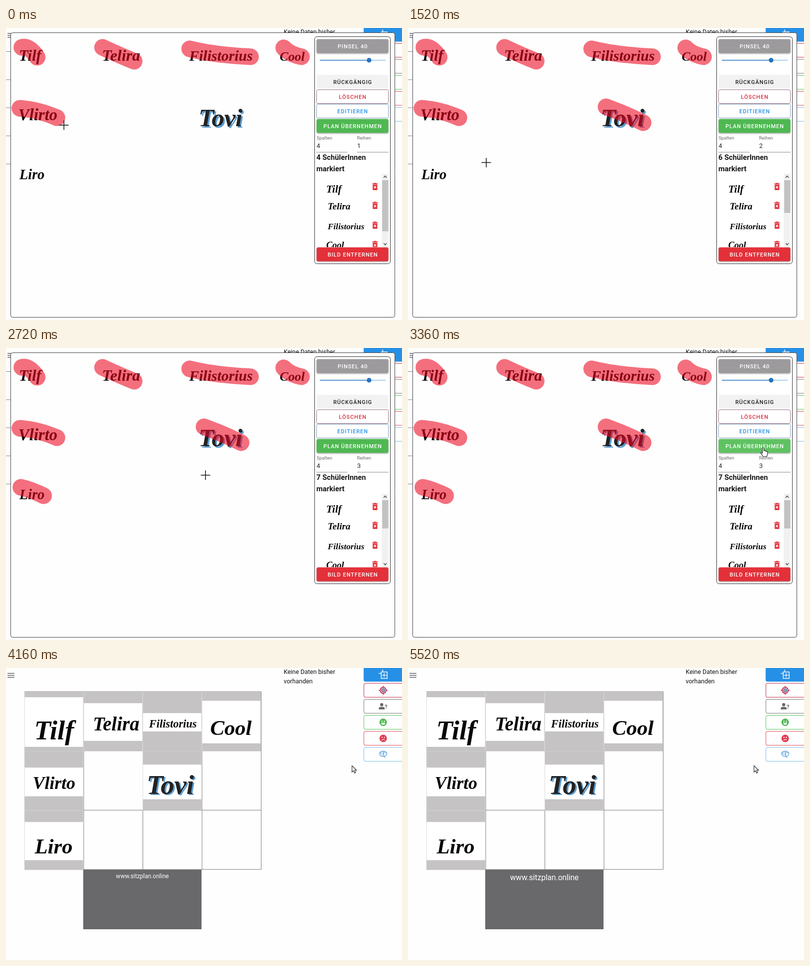
An HTML page with a canvas that plays this animation: 800 by 589 pixels, repeating every 5680 ms.

```html
<!DOCTYPE html>
<html lang="de">
<head>
<meta charset="utf-8">
<title>Sitzplan</title>
<style>
  html, body { margin: 0; width: 100%; height: 100%; overflow: hidden; background: #fefefe; }
  canvas { display: block; }
</style>
</head>
<body>
<canvas id="stage" width="800" height="589"></canvas>
<script>
const ctx = document.getElementById('stage').getContext('2d');
const LOOP = 5680, STEP = 80;
const UI = 'Roboto, "Noto Sans", sans-serif';
const SCRIPT = 'italic bold {}px "Liberation Serif", "Times New Roman", serif';
const RED = '#e33039', BLUE = '#2590e6', GREEN = '#4eb851';

// note: x, baseline, size on the sheet; mark: start, bend, end of the brush stroke;
// seat: column, row; band: white strip in the seat; tag: x, baseline, size in the seat
const pupils = [
  { name: 'Tilf', note: [26, 66, 31], mark: [32, 39, 47, 42, 63, 59], seat: [0, 0], band: [11, 111], tag: [20, 96, 55] },
  { name: 'Telira', note: [194, 66, 32], mark: [195, 39, 228, 54, 259, 67], seat: [1, 0], band: [23, 99], tag: [19, 78, 39] },
  { name: 'Filistorius', note: [370, 66, 30], mark: [371, 42, 425, 52, 494, 58], seat: [2, 0], band: [43, 80], tag: [13, 72, 22.5] },
  { name: 'Cool', note: [553, 66, 26], mark: [561, 40, 576, 51, 597, 58], seat: [3, 0], band: [18, 104], tag: [17, 87, 43] },
  { name: 'Vlirto', note: [25, 186, 33], mark: [28, 162, 65, 168, 103, 181], seat: [0, 1], band: [33, 91], tag: [17, 76, 36] },
  { name: 'Tovi', note: [389, 198, 51], mark: [400, 159, 438, 174, 475, 191], seat: [2, 1], band: [27, 97], tag: [8, 86, 55], shadow: true, from: 640, to: 960 },
  { name: 'Liro', note: [27, 305, 28.6], mark: [30, 281, 53, 288, 76, 298], seat: [0, 2], band: [23, 100], tag: [21, 86, 43], from: 1760, to: 2160 }
];
const listRows = [[647, 332, 21, 320], [650, 366, 19, 358], [650, 406, 17.3, 398], [647, 444, 18.5, 437]];

// time, x, y
const pointer = [
  [0, 117, 196], [80, 117, 196], [640, 411, 173], [960, 487, 204], [1040, 487, 204],
  [1760, 43, 295], [2160, 89, 312], [2240, 89, 312], [3200, 717, 201], [3520, 718, 201], [4000, 699, 197]
];

const clamp = v => Math.max(0, Math.min(1, v));
const ease = v => { v = clamp(v); return v * v * (3 - 2 * v); };

function rect(x, y, w, h, color) {
  ctx.fillStyle = color;
  ctx.fillRect(x, y, w, h);
}

function box(x, y, w, h, r, fill, stroke) {
  ctx.beginPath();
  ctx.roundRect(x, y, w, h, r);
  if (fill) { ctx.fillStyle = fill; ctx.fill(); }
  if (stroke) { ctx.strokeStyle = stroke; ctx.lineWidth = 1; ctx.stroke(); }
}

function line(color, width, ...pts) {
  ctx.beginPath();
  for (let i = 0; i < pts.length; i += 2) ctx.lineTo(pts[i], pts[i + 1]);
  ctx.strokeStyle = color;
  ctx.lineWidth = width;
  ctx.stroke();
}

function disc(x, y, r, color) {
  ctx.beginPath();
  ctx.arc(x, y, r, 0, 7);
  ctx.fillStyle = color;
  ctx.fill();
}

function ring(x, y, r, color, width, from = 0, to = 7) {
  ctx.beginPath();
  ctx.arc(x, y, r, from, to);
  ctx.strokeStyle = color;
  ctx.lineWidth = width;
  ctx.stroke();
}

function text(str, x, y, size, color, { weight = 400, align = 'left', spacing = 0 } = {}) {
  ctx.font = `${weight} ${size}px ${UI}`;
  ctx.textAlign = align;
  ctx.letterSpacing = spacing + 'px';
  ctx.fillStyle = color;
  ctx.fillText(str, x, y);
  ctx.letterSpacing = '0px';
}

function lettering(p, x, y, size) {
  ctx.font = SCRIPT.replace('{}', size);
  ctx.textAlign = 'left';
  if (p.shadow) {
    ctx.fillStyle = '#5b9dd2';
    ctx.fillText(p.name, x + 3, y + 2.5);
  }
  ctx.fillStyle = p.shadow ? '#222' : '#080808';
  ctx.fillText(p.name, x, y);
}

function button(label, y, color, fill, border, raised) {
  ctx.save();
  if (raised) {
    ctx.shadowColor = 'rgba(0,0,0,.35)';
    ctx.shadowBlur = 3;
    ctx.shadowOffsetY = 1.5;
  }
  box(627.5, y + .5, 145, 28, 3, fill, border);
  ctx.restore();
  text(label, 700.5, y + 18.5, 11, color, { weight: 500, align: 'center', spacing: 1 });
}

function face(y, color, happy) {
  disc(762, y, 7.5, color);
  disc(759.5, y - 2, 1.2, '#fff');
  disc(764.5, y - 2, 1.2, '#fff');
  if (happy) {
    ctx.beginPath();
    ctx.arc(762, y + 1, 4, 0, Math.PI);
    ctx.fillStyle = '#fff';
    ctx.fill();
  } else line('#fff', 1.3, 758.5, y + 4, 762, y + 2, 765.5, y + 3);
}

function sideButtons() {
  box(722.5, -4, 84, 31.5, 4, BLUE);
  ctx.strokeStyle = '#fff';
  ctx.lineWidth = 1.4;
  ctx.strokeRect(758, 8, 12, 13);
  line('#fff', 1.2, 764, 10, 764, 19);
  line('#fff', 1.2, 759, 14.5, 769, 14.5);
  line('#fff', 1.4, 753, 11, 758, 11);
  line('#fff', 1.4, 761, 3, 761, 8);
  ['#c32c4e', '#777', '#55c558', '#e04457', '#78bbed'].forEach((c, i) =>
    box(723, 31 + i * 32.3, 84, 28, 3, '#fff', c));

  ring(762, 45, 6, '#c32c4e', 1.8);
  ring(762, 45, 3, '#35507e', 1.6);
  disc(762, 45, 1.2, '#c32c4e');
  for (const [dx, dy] of [[1, 0], [-1, 0], [0, 1], [0, -1]])
    line('#c32c4e', 1.6, 762 + 5 * dx, 45 + 5 * dy, 762 + 9 * dx, 45 + 9 * dy);

  disc(759, 74, 3.2, '#666');
  box(753, 78.5, 12, 5, [4, 4, 0, 0], '#666');
  text('?', 765, 81.5, 11, '#666', { weight: 700 });
  face(109.5, '#4cba4f', true);
  face(142, '#e13a4e', false);

  ctx.beginPath();
  ctx.ellipse(762, 173, 7.5, 5.5, 0, 0, 7);
  ctx.fillStyle = '#fff';
  ctx.fill();
  ctx.strokeStyle = '#67afe6';
  ctx.lineWidth = 1.5;
  ctx.stroke();
  ring(759, 172, 2.2, '#67afe6', 1.2, 1, 5);
  ring(765, 172, 2.2, '#67afe6', 1.2, 2, 6.5);
  line('#67afe6', 1.5, 762, 168, 762, 176, 766, 181);
}

function pageBase() {
  rect(0, 0, 800, 589, '#fefefe');
  for (const y of [10, 14, 18]) rect(3, y, 14, 1.5, '#666');
  text('Keine Daten bisher', 561, 12, 12.5, '#151515');
  text('vorhanden', 561, 31, 12.5, '#151515');
  sideButtons();
}

function grid(x, y, cols, rows, size) {
  const right = x + cols * size, bottom = y + rows * size;
  for (let c = 0; c <= cols; c++) line('#7c7c7c', 1, x + c * size, y, x + c * size, bottom);
  for (let r = 0; r <= rows; r++) line('#7c7c7c', 1, x, y + r * size, right, y + r * size);
}

function seat(p, scale) {
  const pitch = 119.5;
  ctx.save();
  ctx.translate(37 + p.seat[0] * pitch, 48 + p.seat[1] * 119.8);
  ctx.scale(scale, scale);
  rect(0, 0, pitch, 119.8, '#d8d7d8');
  rect(.8, .5, pitch - 1.6, 119, '#c5c3c4');
  rect(.8, p.band[0], pitch - 1.6, p.band[1] - p.band[0], '#fff');
  ctx.beginPath();
  ctx.rect(0, 0, pitch, 119.8);
  ctx.clip();
  lettering(p, ...p.tag);
  ctx.restore();
}

function planScene(t) {
  const small = t < 4080;
  pageBase();
  if (small) grid(37.5, 48, 10, 4, 56.5);
  else grid(37.5, 47.8, 4, 3, 119.5);
  pupils.forEach(p => seat(p, small ? .473 : 1));
  if (small) rect(219, 471, 113, 56, '#69696b');
  else rect(156, 407, 239, 120, '#69696b');
  const large = t >= 4240;
  text('www.sitzplan.online', 275.5, small ? 487 : large ? 428 : 424, large ? 15.6 : 12, '#fff', { align: 'center' });
}

function brush(p, t) {
  const amount = p.from === undefined ? 1 : ease((t - p.from) / (p.to - p.from));
  if (p.from !== undefined && t < p.from) return;
  const [x0, y0, x1, y1, x2, y2] = p.mark;
  ctx.beginPath();
  for (let i = 0; i <= 20; i++) {
    const u = amount * i / 20, v = 1 - u;
    const bend = 4 * u * v;
    ctx.lineTo(x0 * v + x2 * u + bend * (x1 - (x0 + x2) / 2), y0 * v + y2 * u + bend * (y1 - (y0 + y2) / 2));
  }
  if (amount === 0) ctx.lineTo(x0 + .01, y0);
  ctx.strokeStyle = 'rgba(238,0,28,.56)';
  ctx.lineWidth = 33.5;
  ctx.lineCap = ctx.lineJoin = 'round';
  ctx.stroke();
  ctx.lineCap = 'butt';
  ctx.lineJoin = 'miter';
}

function trash(x, y) {
  rect(x - 5.5, y - 6.5, 11, 1.8, RED);
  rect(x - 2.5, y - 7.5, 5, 1.5, RED);
  box(x - 4.7, y - 4, 9.4, 11, 1, RED);
  line('#fff', 1.3, x - 2.2, y - 1, x + 2.2, y + 3.5);
  line('#fff', 1.3, x + 2.2, y - 1, x - 2.2, y + 3.5);
}

function pupilList(count) {
  ctx.save();
  ctx.beginPath();
  ctx.rect(625, 294, 150, 148);
  ctx.clip();
  listRows.forEach(([x, y, size, iconY], i) => {
    lettering(pupils[i], x, y, size);
    trash(745.5, iconY);
  });
  rect(759, 294, 14, 148, '#f1f1f1');
  rect(760, 307, 12.5, [103, 81, 66, 57][count - 4], '#c2c2c2');
  line('#505050', 1.5, 763, 302, 766, 298.5, 769, 302);
  line('#505050', 1.5, 763, 434, 766, 437.5, 769, 434);
  ctx.restore();
}

function panel(t) {
  const count = 4 + (t >= 80) + (t >= 1040) + (t >= 2240);
  box(623.5, 17.5, 153, 458, 5, '#fff', '#333');
  button('PINSEL 40', 22, '#fff', '#9c9a9c', null, true);
  line('#8cc0ec', 1.5, 733, 65, 767, 65);
  line('#2374c0', 1.6, 634, 65, 733, 65);
  disc(733.5, 65, 4.7, '#2374c0');
  button('RÜCKGÄNGIG', 94, '#222', '#f3f2f3');
  button('LÖSCHEN', 124, '#d92c40', '#fff', '#9b7084');
  button('EDITIEREN', 153, BLUE, '#fff', '#7d9ebb');
  button('PLAN ÜBERNEHMEN', 183, '#fff', t >= 3200 ? '#5fc262' : GREEN, null, true);
  text('Spalten', 627.5, 225, 9.4, '#6c6c6c');
  text('Reihen', 709, 225, 9.4, '#6c6c6c');
  text('4', 627.5, 242, 12.5, '#222');
  text(Math.ceil(count / 2) - 1 + (count === 6 ? 0 : 0), 709.5, 242, 12.5, '#222');
  line('#909090', 1, 627, 250.5, 690, 250.5);
  line('#909090', 1, 709, 250.5, 773, 250.5);
  text(count + ' SchülerInnen', 627, 266, 14.8, '#181818', { weight: 700 });
  text('markiert', 627, 288.5, 14.8, '#181818', { weight: 700 });
  pupilList(count);
  button('BILD ENTFERNEN', 442, '#fff', RED, null, true);
}

function markingScene(t) {
  pageBase();
  for (let i = 0; i < 5; i++) line('#858585', 1, 0, 47.5 + i * 56.7, 37, 47.5 + i * 56.7);
  box(9.5, 9.5, 776, 574, 4, '#fefefe', '#444');
  pupils.forEach(p => lettering(p, ...p.note));
  pupils.forEach(p => brush(p, t));
  panel(t);
}

function pointerAt(t) {
  const next = pointer.findIndex(k => k[0] > t);
  if (next < 0) return pointer[pointer.length - 1].slice(1);
  const [ta, xa, ya] = pointer[next - 1], [tb, xb, yb] = pointer[next];
  const u = ease((t - ta) / (tb - ta));
  return [xa + (xb - xa) * u, ya + (yb - ya) * u];
}

const arrowShape = new Path2D('M0 0V13L3 10.2L5.2 15L7.4 14L5.3 9.3H9.2Z');
const handShape = new Path2D('M-1.5 1Q0 -1 1.5 1V6Q3 5 4 7Q5.5 6 6.5 8Q9 7 9 10V13Q8 15 7.5 18H-.5Q-2 14-5 11Q-4.5 8.5-1.5 11Z');

function drawPointer(t) {
  const [x, y] = pointerAt(t);
  if (x < 623 && t < 4000) {
    line('#111', 1.5, x - 9.5, y, x + 9.5, y);
    line('#111', 1.5, x, y - 9.5, x, y + 9.5);
    return;
  }
  ctx.save();
  ctx.translate(x, y);
  const shape = t >= 3200 && t < 4000 ? handShape : arrowShape;
  ctx.fillStyle = '#fff';
  ctx.fill(shape);
  ctx.strokeStyle = '#222';
  ctx.lineWidth = 1.1;
  ctx.stroke(shape);
  ctx.restore();
}

function frame(now) {
  const t = Math.floor((now % LOOP) / STEP) * STEP;
  if (t < 4000) markingScene(t);
  else planScene(t);
  drawPointer(t);
  requestAnimationFrame(frame);
}
requestAnimationFrame(frame);
</script>
</body>
</html>
```
